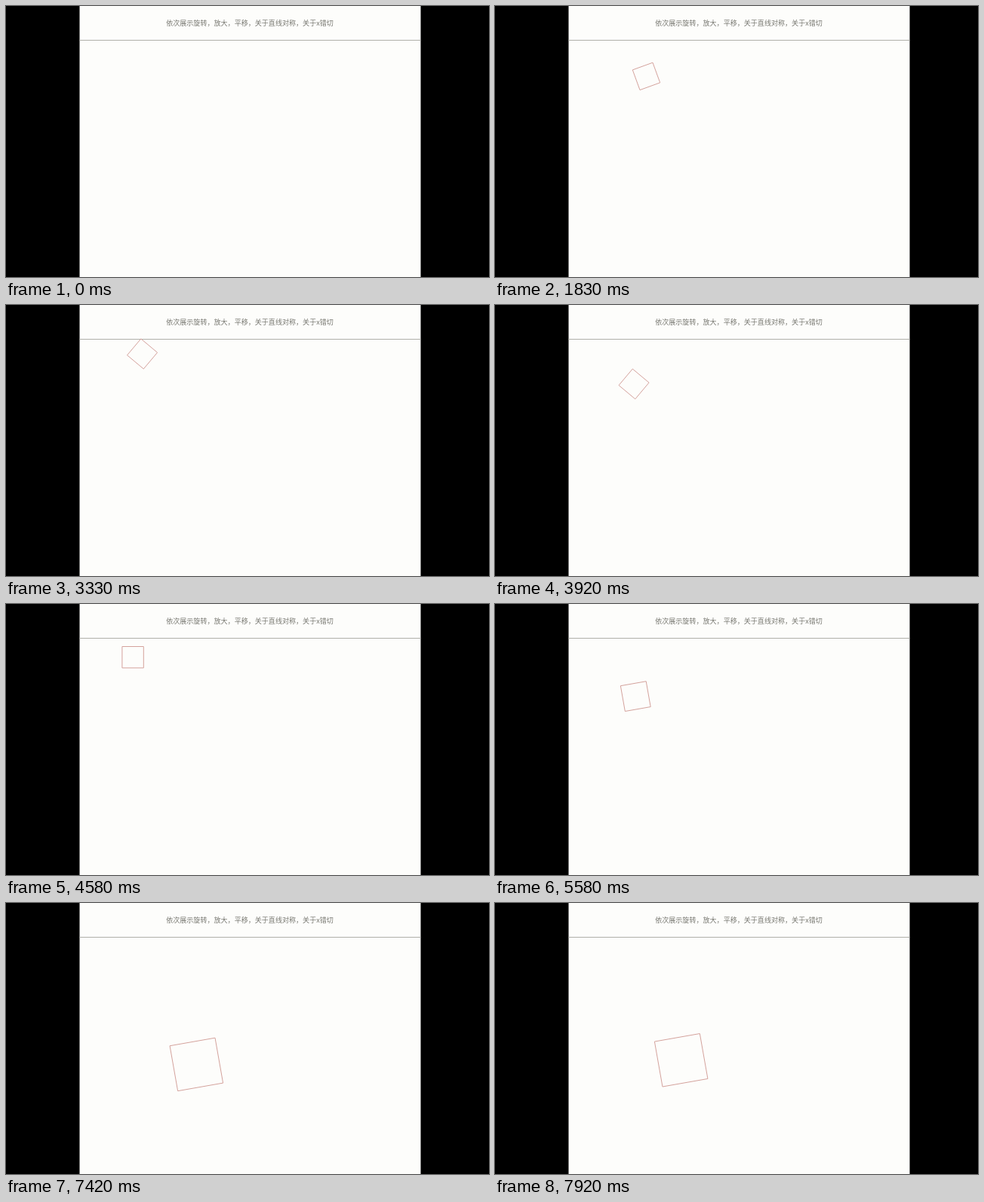
Animation, 640 px wide and 360 px high, one loop 8 s. Source, as an HTML page:

```html
<!DOCTYPE html>
<html>
<head>
<meta charset="utf-8">
<title>Square transforms</title>
<style>
  html, body { margin: 0; width: 100%; height: 100%; overflow: hidden; background: #000; }
  svg { display: block; width: 640px; height: 360px; }
  text { font: 9.06px "Noto Sans CJK SC", "Noto Sans CJK", sans-serif; fill: #777770; text-anchor: middle; }
  #square { fill: none; stroke: #d4a29c; stroke-width: 1; vector-effect: non-scaling-stroke; }
</style>
</head>
<body>
<svg viewBox="0 0 640 360">
  <rect width="640" height="360" fill="#000"/>
  <rect x="97.5" width="452" height="360" fill="#fdfdfb"/>
  <rect x="97.5" y="45" width="452" height="1" fill="#b0b0aa"/>
  <text x="323" y="26">依次展示旋转，放大，平移，关于直线对称，关于x错切</text>
  <rect id="square" x="85.3" y="84.9" width="28.4" height="28.4"/>
</svg>
<script>
  const LOOP = 8000, STEP = 1000 / 12, SHOW = 1830;
  const square = document.getElementById('square');

  // Whole ticks of a stage done at time t, up to max
  const ticks = (t, start, every, max) =>
    Math.max(0, Math.min(max, Math.floor((t - start) / every)));

  function draw(time) {
    const t = Math.floor((time % LOOP + 5) / STEP) * STEP;
    const angle = -10 * ticks(t, 1767, 31.25, 100);
    const scale = 1.1 ** ticks(t, 4983, 250, 8);
    const shift = -2.83 * ticks(t, 6983, 250, 5);
    square.style.visibility = t < SHOW ? 'hidden' : 'visible';
    square.setAttribute('transform',
      `translate(${97 + shift} ${shift}) scale(${scale}) rotate(${angle} 85.3 84.9)`);
  }

  const start = performance.now();
  function tick() {
    draw(performance.now() - start);
    requestAnimationFrame(tick);
  }
  tick();
</script>
</body>
</html>
```
